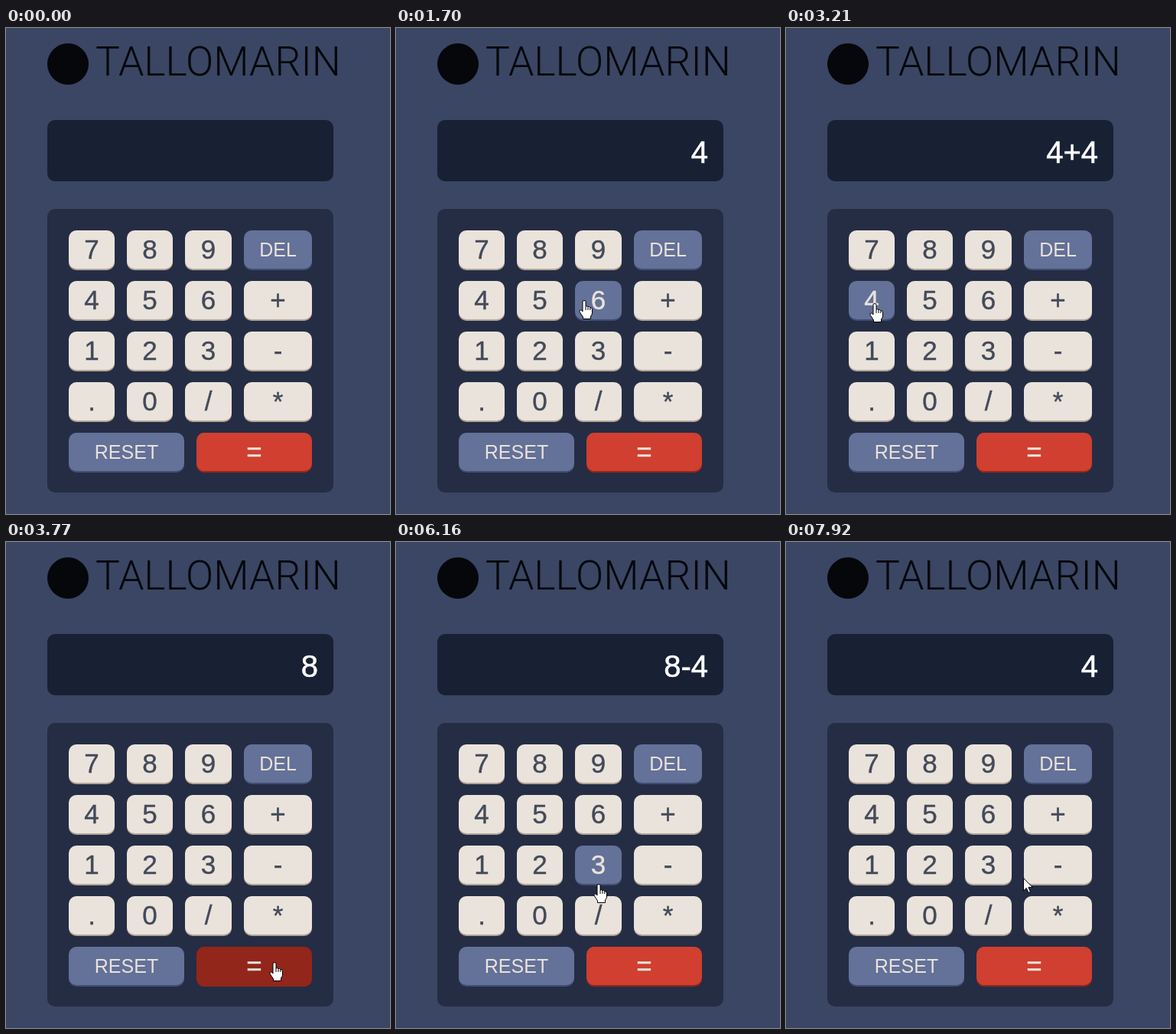
An HTML page that plays this animation: 502x634 px, repeating every 7990 ms.

```html
<!DOCTYPE html>
<html lang="en">
<head>
<meta charset="utf-8">
<title>Calculator</title>
<style>
  html, body { margin: 0; width: 100%; height: 100%; overflow: hidden; background: #3a4663; }
  svg { display: block; width: 502px; height: 634px; font-family: "Liberation Sans", Arial, sans-serif; }
  .title { font: 300 53.5px Roboto, sans-serif; fill: #05070b; }
  .display { font-size: 40px; fill: #fff; stroke: #fff; stroke-width: .6; text-anchor: end; }
  .key { --face: #eae3dc; --edge: #b4a597; --ink: #434a59; font-size: 35px; text-anchor: middle; }
  .key.word { font-size: 25px; }
  .key.word, .key.hover { --face: #647198; --edge: #414e73; --ink: #eae3dc; }
  .key.equals { --face: #d03f2f; --edge: #93261a; --ink: #eae3dc; }
  .key.equals.hover { --face: #93261a; }
  .edge { fill: var(--edge); }
  .face { fill: var(--face); }
  .key text { fill: var(--ink); stroke: var(--ink); stroke-width: .4; }
  .key.word text { stroke: none; }
  .cursor { fill: #fff; stroke: #000; stroke-linejoin: round; }
</style>
</head>
<body>
<svg viewBox="0 0 502 634">
  <circle cx="81" cy="47" r="27" fill="#05070b"/>
  <text class="title" x="117" y="62">TALLOMARIN</text>
  <rect x="54" y="120" width="374" height="80" rx="10" fill="#182034"/>
  <text class="display" id="display" x="408" y="176"></text>
  <rect x="54" y="236" width="374" height="370" rx="10" fill="#242d44"/>
  <g id="keys"></g>
  <g class="cursor" id="cursor">
    <path id="arrow" d="M.5 .5V17L4.3 13.4 7 19.5 9.5 18.4 6.9 12.4H12.2Z"/>
    <path id="hand" d="M-2 15V2Q-2 .5 0 .5T2 2V8.2Q3.5 7 5 8.6 6.5 7.8 7.8 9.7 10.5 9.4 10.5 12V17Q10.5 19 8.5 21V24.5H-1.5V22L-5.8 15.5Q-6.5 13.5-5 12.8-3.5 12.6-2 15ZM2 8.2V13M5 8.6V13M7.8 9.7V13"/>
  </g>
</svg>
<script>
const LOOP = 7990;
const LEFT = 82, RIGHT = 400, TOP = 264;
const COLUMN = 76.2, ROW = 66, GAP = 16, KEY_HEIGHT = 52;
const $ = id => document.getElementById(id);

// Each row spreads evenly from the left; its last key reaches the right edge
const keypad = [['789', 'DEL'], ['456', '+'], ['123', '-'], ['.0/', '*']];
const keys = keypad.flatMap(([digits, last], row) => [...digits, last].map((label, col) => {
  const x = LEFT + COLUMN * col;
  return makeKey(label, x, label === last ? RIGHT : x + COLUMN - GAP, row);
}));
const middle = (LEFT + RIGHT) / 2;
keys.push(makeKey('RESET', LEFT, middle - GAP / 2, 4), makeKey('=', middle + GAP / 2, RIGHT, 4));

function makeKey(label, from, to, row) {
  const x = Math.round(from), w = Math.round(to) - x, y = TOP + ROW * row;
  const kind = label.length > 1 ? 'word' : label === '=' ? 'equals' : '';
  const node = document.createElementNS('http://www.w3.org/2000/svg', 'g');
  node.setAttribute('class', `key ${kind}`);
  node.innerHTML = `
    <rect class="edge" x="${x}" y="${y + 2}" width="${w}" height="50" rx="10"/>
    <rect class="face" x="${x}" y="${y}" width="${w}" height="50" rx="10"/>
    <text x="${x + w / 2}" y="${y + (kind === 'word' ? 34 : 37)}">${label}</text>`;
  $('keys').append(node);
  const contains = (px, py) => px >= x && px < x + w && py >= y && py < y + KEY_HEIGHT;
  return { node, contains };
}

const point = (x, y) => ({ x, y });
const entry = point(394, 600);
const four = point(115, 358), plus = point(356, 352), minus = point(370, 411);
const equals = point(351, 548), equalsLeft = point(313, 557), exit = point(310, 438);

// The pointer glides to a key, bending towards "via", and clicks it to show a readout
const trips = [
  { start: 130, ms: 840, to: four, via: point(135, 560), click: 1490, readout: '4' },
  { start: 1490, ms: 650, to: plus, click: 2320, readout: '4+' },
  { start: 2250, ms: 570, to: four, click: 3210, readout: '4+4' },
  { start: 3210, ms: 540, to: equals, click: 3770, readout: '8' },
  { start: 4160, ms: 560, to: minus, via: point(362, 230), click: 4980, readout: '8-' },
  { start: 4910, ms: 700, to: four, click: 5750, readout: '8-4' },
  { start: 5750, ms: 1110, to: equalsLeft, via: point(277, 390), click: 7110, readout: '4' },
  { start: 7500, ms: 420, to: exit, via: point(255, 510) },
];
trips.forEach((trip, i) => trip.from = i ? trips[i - 1].to : entry);

const easeOut = k => 1 - (1 - k) ** 2;
const mix = (a, b, u) => a + (b - a) * u;
const mixPoints = (p, q, u) => point(mix(p.x, q.x, u), mix(p.y, q.y, u));

function pointerAt(time) {
  const trip = trips.findLast(({ start }) => start <= time);
  if (!trip) return null;
  const { start, ms, from, to, via = mixPoints(from, to, .5) } = trip;
  const u = easeOut(Math.min(1, (time - start) / ms));
  const { x, y } = mixPoints(mixPoints(from, via, u), mixPoints(via, to, u), u);
  return point(Math.round(x), Math.round(y));
}

const show = (node, visible) => node.setAttribute('visibility', visible ? 'visible' : 'hidden');

function draw() {
  const time = performance.now() % LOOP;
  const pointer = pointerAt(time);
  const hovered = pointer && keys.find(key => key.contains(pointer.x, pointer.y));

  $('display').textContent = trips.findLast(({ click }) => click <= time)?.readout ?? '';
  for (const key of keys) key.node.classList.toggle('hover', key === hovered);
  if (pointer) $('cursor').setAttribute('transform', `translate(${pointer.x} ${pointer.y})`);
  show($('arrow'), pointer && !hovered);
  show($('hand'), hovered);
  requestAnimationFrame(draw);
}
draw();
</script>
</body>
</html>
```
